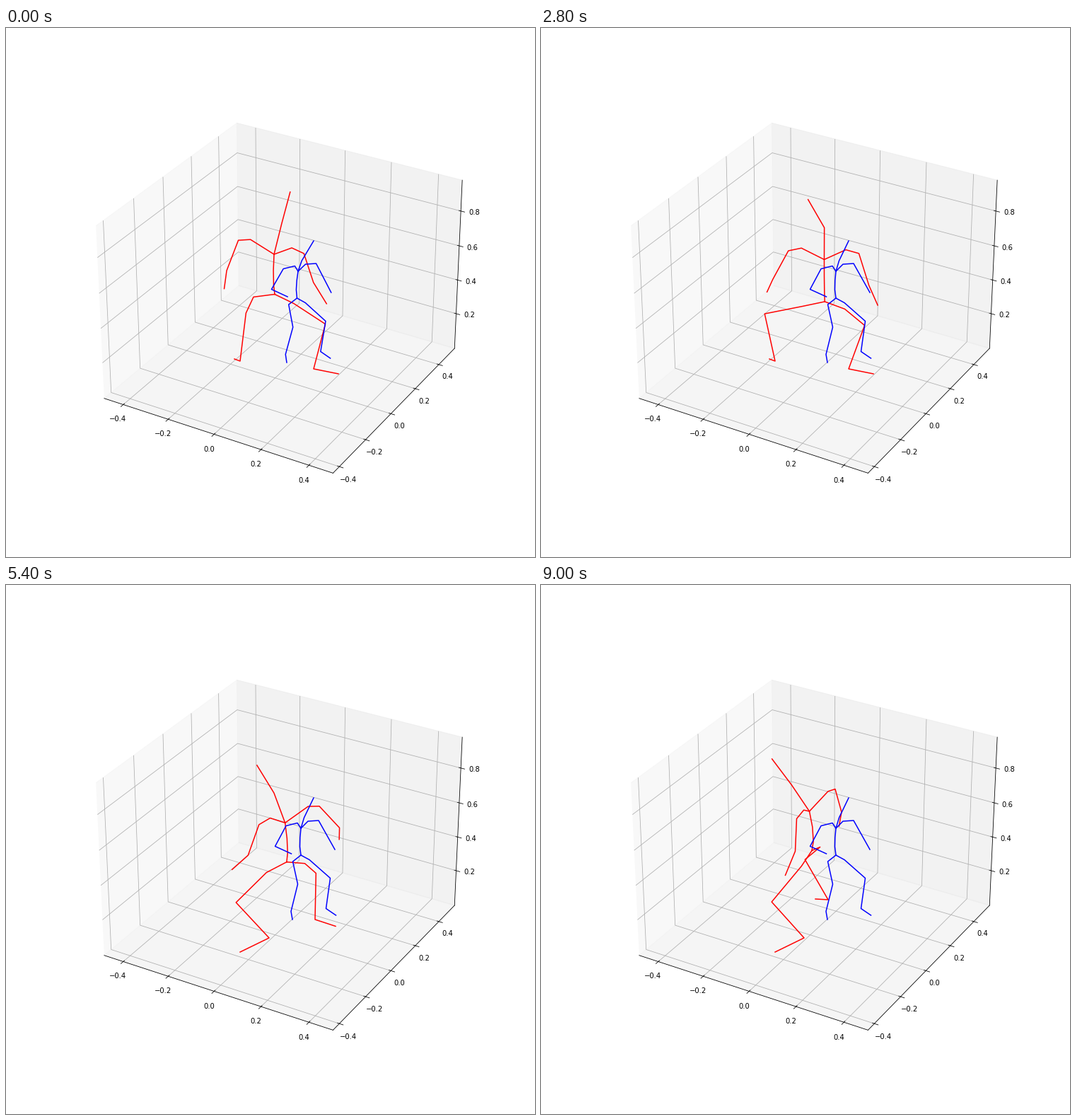
Animation, 748 px wide and 748 px high, one loop 9.2 s. Source, as a matplotlib script:

```python
import numpy as np
import matplotlib.pyplot as plt
from matplotlib.animation import FuncAnimation
from matplotlib.lines import Line2D

SIZE, DPI = 748, 72
FRAMES, INTERVAL = 46, 200
BLUE_STOP = 6  # the blue figure holds still from here on

KEYS = np.array([0, 8, 19, 32, 45], float)


def track(*values):
    """Smooth Hermite curve through one value per key time."""
    values = np.array(values, float)
    slopes = np.gradient(values, KEYS, axis=0)

    def at(n):
        i = min(np.searchsorted(KEYS, n, side="right") - 1, len(KEYS) - 2)
        span = KEYS[i + 1] - KEYS[i]
        s = (n - KEYS[i]) / span
        ease = s * s * (3 - 2 * s)
        return ((1 - ease) * values[i] + ease * values[i + 1]
                + span * s * (1 - s) ** 2 * slopes[i]
                - span * s * s * (1 - s) * slopes[i + 1])

    return at


def path(times, *points):
    """Straight moves between points, resting before and after."""
    xs, ys = zip(*points)
    return lambda n: np.array([np.interp(n, times, xs), np.interp(n, times, ys)])


def upward(degrees, length):
    a = np.radians(degrees)
    return length * np.array([np.sin(a), -np.cos(a)])


def girdle(center, turn, radius):
    """Left and right ends of a level bar turned about the vertical axis."""
    a = np.radians(turn)
    half = radius * np.array([np.cos(a), -0.5 * np.sin(a)])  # seen from 30 degrees up
    return center - half, center + half


# Places and offsets in pixels
root_at = track((380, 376.5), (392, 381), (405.5, 391), (390, 389.5), (383, 375.5))
torso = track((-1, -56.5), (1, -59), (-2.5, -59), (-2, -53.5), (-3.5, -55.5))
left_forearm = track((-3.5, 25.5), (-5, 24), (-12, 14), (-26.5, 25.5), (-14, 34))
right_arm = track((13.5, 41), (7.5, 47), (21.5, 41), (29, 26), (9, 32.5))
right_forearm = track((18.5, 30), (15.5, 31.5), (9, 24), (-5, 13.5), (-3.5, 20))

# Angles in degrees
shoulder_turn = track(-22, -16, 8, 44, 57)
hip_turn = track(-18, -16, 3, 39, 64)
neck_tilt = track(14, 10, -9, -26, -34)
head_tilt = track(15, -24, -29, -33, -37)
left_arm_swing = track(21, 30, 25, 15.5, 2.5)
left_shin_tilt = track(7, 10, -33, -44.5, -42)
right_shin_tilt = track(14.6, 19.6, 17.2, -10, -30)

# One step of each foot
left_step, right_step = [14, 19, 23.5], [26, 27, 32, 37]
left_ankle = path(left_step, (331, 471), (367, 485), (372, 499))
left_toe = path(left_step, (323, 468), (328, 492), (331, 519))
right_ankle = path(right_step, (435, 482), (437, 473), (425, 455), (406, 445))
right_toe = path(right_step, (470, 489), (466, 482.5), (433.5, 461), (388, 444))


def red_chains(n):
    root = root_at(n)
    chest = root + torso(n)
    turn = shoulder_turn(n)
    lean = np.sin(np.radians(turn))
    bow = np.array([3.5 * lean, 0])
    neck = chest + upward(neck_tilt(n), 31)
    skull = chest + upward(neck_tilt(n), 45)
    head = skull + upward(head_tilt(n), 46)
    spine = [root, root + 0.23 * torso(n) + bow, root + 0.6 * torso(n) + bow,
             chest, neck, skull, head]

    collars = girdle(chest + [11 * lean, -15], turn, 31.5)
    shoulders = girdle(chest + [11 * lean, -10.5], turn, 50)
    left_elbow = shoulders[0] - upward(-left_arm_swing(n), 46) * [-1, 1]
    left_elbow = shoulders[0] - upward(left_arm_swing(n), 46)
    right_elbow = shoulders[1] + right_arm(n)
    left_hand = left_elbow + left_forearm(n)
    right_hand = right_elbow + right_forearm(n)

    hips = girdle(root + [-1.5, 8.5], hip_turn(n), 30)
    left_knee = left_ankle(n) + upward(left_shin_tilt(n), 68.5)
    right_knee = right_ankle(n) + upward(right_shin_tilt(n), 65.5)

    return [
        spine,
        [chest, collars[0], shoulders[0], left_elbow, left_hand],
        [chest, collars[1], shoulders[1], right_elbow, right_hand],
        [root, hips[0], left_knee, left_ankle(n), left_toe(n)],
        [root, hips[1], right_knee, right_ankle(n), right_toe(n)],
    ]


BLUE_ROOT, BLUE_CHEST, BLUE_HEAD = (417, 382), (417, 344), (435, 301)
BLUE_CHAINS = [
    [BLUE_ROOT, (415.5, 370), (415.8, 357), BLUE_CHEST, (421.5, 329), BLUE_HEAD],
    [BLUE_CHEST, (412, 336.5), (396, 340.5), (380.5, 369.5), (403.5, 380)],
    [BLUE_CHEST, (427, 334), (442, 333), (465, 374)],
    [BLUE_ROOT, (405.5, 391), (412.5, 423), (403, 461.5), (405, 473)],
    [BLUE_ROOT, (429, 388.5), (458.5, 414.5), (452.5, 457.5), (466.5, 467)],
]


def blue_chains(n):
    """Sway in from the left, hanging from the head."""
    sway = 8 * max(1 - n / BLUE_STOP, 0)
    drop = 170
    return [[(x - sway * np.sqrt((y - BLUE_HEAD[1]) / drop), y) for x, y in chain]
            for chain in BLUE_CHAINS]


fig = plt.figure(figsize=(SIZE / DPI, SIZE / DPI), dpi=DPI)
ax = fig.add_subplot(111, projection="3d")
ax.set_xlim(-0.486, 0.499)
ax.set_ylim(-0.447, 0.538)
ax.set_zlim(-0.0105, 0.9745)
for axis in (ax.xaxis, ax.yaxis):
    axis.set_ticks([-0.4, -0.2, 0.0, 0.2, 0.4])
ax.zaxis.set_ticks([0.2, 0.4, 0.6, 0.8])


def make_lines(color):
    return [fig.add_artist(Line2D([], [], color=color, lw=1.5)) for _ in BLUE_CHAINS]


red_lines, blue_lines = make_lines("red"), make_lines("blue")


def place(lines, chains):
    for line, chain in zip(lines, chains):
        x, y = np.transpose(chain)
        line.set_data(x / SIZE, 1 - y / SIZE)


def draw(n):
    place(red_lines, red_chains(n))
    place(blue_lines, blue_chains(n))
    return red_lines + blue_lines


anim = FuncAnimation(fig, draw, frames=FRAMES, interval=INTERVAL,
                     repeat=True, repeat_delay=0, blit=False)
plt.show()
```
